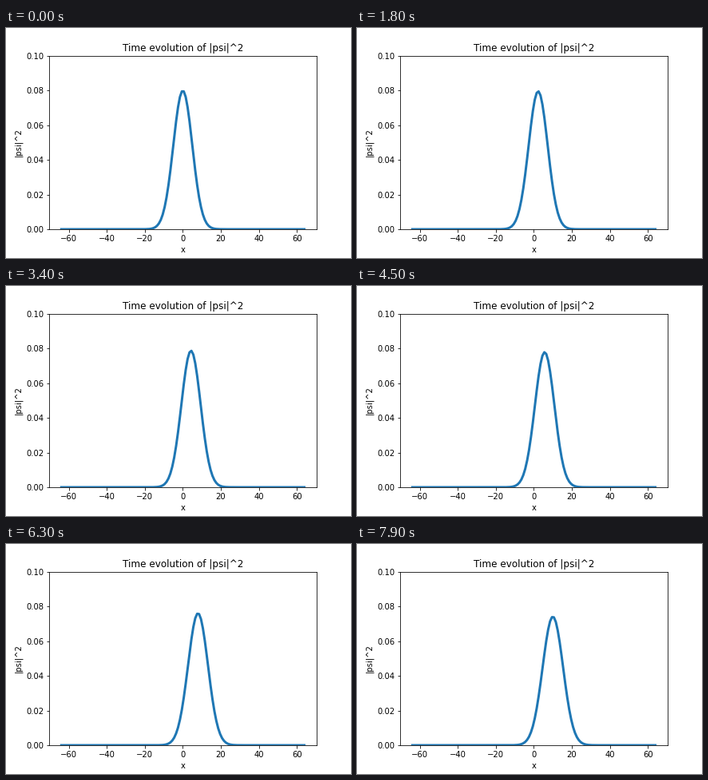
Animation of 432 by 288 pixels, one loop 8 s. Source, as a matplotlib script:

```python
import numpy as np
import matplotlib.pyplot as plt
from matplotlib.animation import FuncAnimation

FRAMES, INTERVAL = 80, 100
SIGMA = 5.0        # initial width of the packet
K0 = 0.5           # mean wave number
DT = 0.25          # time per frame
N = 128

x = np.linspace(-64, 64, N)
cell = x[1] - x[0]


def density(t):
    """|psi|^2 of a free Gaussian packet, evolved in grid units."""
    t = t * cell**2
    width = SIGMA * np.sqrt(1 + (t / (2 * SIGMA**2))**2)
    z = (x - K0 * t) / width
    return np.exp(-z**2 / 2) / (width * np.sqrt(2 * np.pi))


fig = plt.figure(figsize=(6, 4), dpi=72, facecolor="white")
fig.subplots_adjust(left=0.125, right=0.9, bottom=0.125, top=0.88)
ax = fig.add_subplot()
ax.set_title("Time evolution of |psi|^2")
ax.set_xlabel("x")
ax.set_ylabel("|psi|^2")
ax.set_xlim(-70.4, 70.4)
ax.set_ylim(0, 0.1)
ax.set_xticks(range(-60, 61, 20))
ax.set_yticks(np.linspace(0, 0.1, 6))

line, = ax.plot(x, density(0), lw=3, color="#1f77b4")


def update(frame):
    line.set_ydata(density(frame * DT))
    return line,


anim = FuncAnimation(fig, update, frames=FRAMES, interval=INTERVAL,
                     repeat=True, repeat_delay=0)
plt.show()
```
